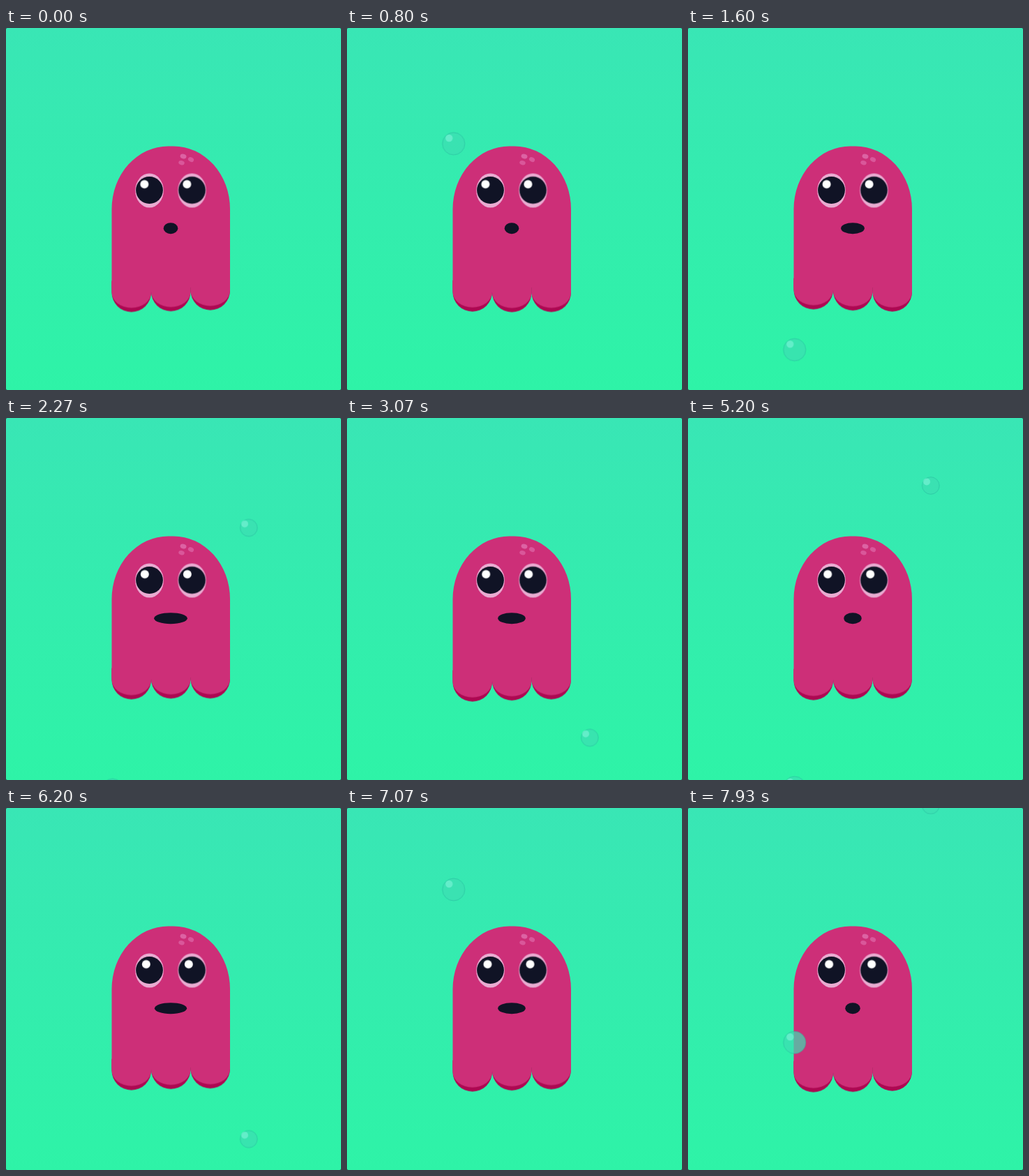
Animation, 480 px wide and 519 px high, one loop 8 s. Source, as an HTML page:

```html
<!DOCTYPE html>
<html lang="en">
<head>
<meta charset="utf-8">
<title>Ghost with bubbles</title>
<style>
  html, body { margin: 0; width: 100%; height: 100%; overflow: hidden; background: #1d4a45; }
  svg { display: block; width: 480px; height: 519px; }

  .skin { fill: #cd2f78; }
  .rim { fill: #ad0852; }
  .dark { fill: #101325; }
  .spots { fill: #dc62a3; }
  .white { fill: #e9abd1; }

  .lobe { animation: sway 500ms cubic-bezier(.37, 0, .63, 1) infinite alternate; }
  .lobe.left { animation-delay: -65ms; }
  .lobe.middle { animation-delay: -165ms; }
  .lobe.right { animation-delay: -265ms; }
  @keyframes sway {
    from { transform: translateY(2.7px); }
    to { transform: translateY(-2.7px); }
  }

  .glint { fill: #fff; animation: glance 1s cubic-bezier(.37, 0, .63, 1) -1960ms infinite alternate; }
  @keyframes glance {
    from { transform: translateX(0); }
    to { transform: translateX(8.8px); }
  }

  .mouth { animation: talk 4s linear infinite; }
  @keyframes talk {
    0%, 24.4%, 99.4%, 100% { rx: 10.3px; }
    61.9% { rx: 26px; }
  }

  /* Each fall speeds up evenly; the jump back to the top happens off stage. */
  .bubble {
    --fall: cubic-bezier(.333, .177, .667, .51);
    fill: rgba(60, 222, 178, .7);
    stroke: rgba(38, 180, 155, .5);
  }
  .bubble .shine { fill: rgba(130, 245, 218, .6); stroke: none; }
  .bubble.big { animation: fall-big 8s infinite; }
  .bubble.small { animation: fall-small 8s infinite; }
  @keyframes fall-big {
    0% { transform: translate(152.7px, -23.5px); animation-timing-function: step-end; }
    3.75%, 41.25% { transform: translate(152.7px, -23.5px); animation-timing-function: var(--fall); }
    32.5%, 70% { transform: translate(152.7px, 540px); animation-timing-function: step-end; }
    78.125% { transform: translate(152.7px, -23.5px); animation-timing-function: cubic-bezier(.333, .199, .667, .533); }
    100% { transform: translate(152.7px, 357px); }
  }
  @keyframes fall-small {
    0% { transform: translate(347.8px, -23.5px); animation-timing-function: step-end; }
    22.3125%, 60.3125% { transform: translate(347.8px, -23.5px); animation-timing-function: var(--fall); }
    51.0625%, 89.0625% { transform: translate(347.8px, 540px); animation-timing-function: step-end; }
    97.375% { transform: translate(347.8px, -23.5px); animation-timing-function: linear; }
    100% { transform: translate(347.8px, 6px); }
  }
</style>
</head>
<body>
<svg viewBox="0 0 480 519">
  <defs>
    <linearGradient id="sea" x2="0" y2="1">
      <stop stop-color="#39e6b5"/>
      <stop offset="1" stop-color="#2ef3a7"/>
    </linearGradient>
    <g id="foot">
      <path class="rim" d="M0 360h56.5v16.4a28.25 28.25 0 0 1-56.5 0z"/>
      <path class="skin" d="M0 360h56.5v16.4a28.25 22.3 0 0 1-56.5 0z"/>
    </g>
    <g id="eye">
      <ellipse class="white" cy=".5" rx="20.3" ry="24.5"/>
      <circle class="dark" r="19.4"/>
      <circle class="glint" cx="-7.2" cy="-8.5" r="6"/>
    </g>
  </defs>

  <rect width="480" height="519" rx="2" fill="url(#sea)"/>

  <g class="lobe left"><use href="#foot" x="151.5"/></g>
  <g class="lobe middle"><use href="#foot" x="208"/></g>
  <g class="lobe right"><use href="#foot" x="264.5"/></g>
  <path class="skin" d="M151.5 372V259.5a81 90 0 0 1 81-90h7.5a81 90 0 0 1 81 90V372z"/>

  <g class="spots">
    <ellipse rx="4.5" ry="3.3" transform="translate(254 184) rotate(15)"/>
    <ellipse rx="4.3" ry="3.2" transform="translate(265 188.6) rotate(30)" opacity=".8"/>
    <ellipse rx="4.3" ry="3.1" transform="translate(251.5 193.2) rotate(15)" opacity=".8"/>
  </g>

  <use href="#eye" x="205.5" y="232.5"/>
  <use href="#eye" x="266.5" y="232.5"/>
  <ellipse class="mouth dark" cx="236" cy="287.2" rx="10.3" ry="8"/>

  <g class="bubble big">
    <circle r="16"/>
    <circle class="shine" cx="-6.5" cy="-8" r="5.2"/>
  </g>
  <g class="bubble small">
    <circle r="12.3"/>
    <circle class="shine" cx="-5.8" cy="-5.6" r="5"/>
  </g>
</svg>
</body>
</html>
```
